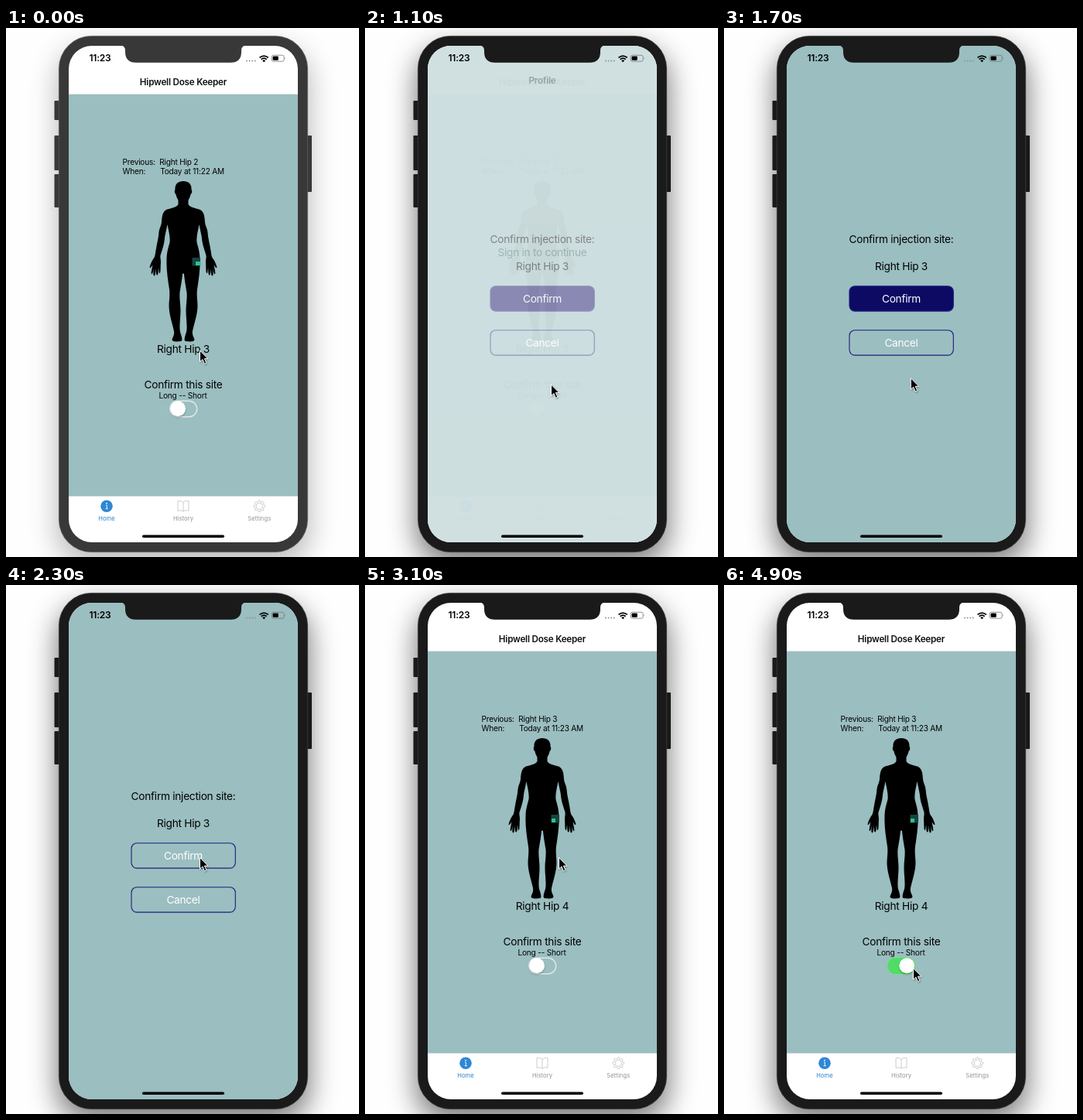
Animation of 456 by 684 pixels, one loop 5 s. Source, as an HTML page:

```html
<!DOCTYPE html>
<html lang="en">
<head>
<meta charset="utf-8">
<title>Injection site app</title>
<style>
html, body { margin: 0; width: 100%; height: 100%; overflow: hidden; background: #fefefe; }
svg { display: block; width: 100vw; height: 100vh; }
text { font-family: Inter, Roboto, sans-serif; letter-spacing: -.02em; white-space: pre; }
.mid { text-anchor: middle; }
.big { font-size: 13.7px; }
.small { font-size: 10.1px; }
.title { font-size: 11.7px; font-weight: 600; fill: #111; }
.tab { font-size: 7.6px; letter-spacing: .01em; fill: #939393; }
.icon { fill: none; stroke: #bcbcbc; stroke-width: .75; stroke-linejoin: round; }
</style>
</head>
<body>
<svg viewBox="0 0 456 684">
  <defs>
    <clipPath id="screen"><rect x="81" y="23" width="296" height="642" rx="30"/></clipPath>
    <filter id="blur" x="-30%" y="-20%" width="160%" height="140%"><feGaussianBlur stdDeviation="18"/></filter>
    <filter id="soft" x="-50%" y="-50%" width="200%" height="200%"><feGaussianBlur stdDeviation="1.2"/></filter>
    <path id="half" d="M229 198C222 198 218 202 218.5 209C217 210 218 214 219.5 215C220 219 222 221 222.5 223V228C221 232 212 233 207 235C202 238 201.5 244 201 251C200.5 256 198 259 197.5 264C197 272 195 278 194 285C192.5 292 193 296 190 299C188 302 186 307 185.5 309.5C186.5 311 188 309 189.5 306C188.5 312 187 317 188 318C189 319 190 315 191 311C190 317 190 320 191.5 320.5C193 321 193 315 194 311C193.5 316 194 320 195.5 319.5C197 319 196.5 314 197 310C197.5 314 197.5 317.5 198.8 317C200 315 199.5 308 200 303C200 299 199 297 199.5 294C202 286 204.5 279 205 272C205.5 267 207 262 208.5 254C210 262 212.3 270 211.5 277C209.5 285 207.5 290 207.5 300C207 312 209 325 211 338C212 346 210.5 352 210.5 360C211 372 215 382 217 392C218 397 215 400 214.5 403C215 406 221 405.5 226 405C229 404 226.5 398 225 393C223.5 386 225.5 376 225.5 365C225.5 357 223.8 350 224.5 342C226 333 227.6 324 228 318L229.3 317V198Z"/>
  </defs>
  <rect width="456" height="684" fill="#fefefe"/>
  <rect id="shadow" x="66" y="26" width="326" height="668" rx="42" filter="url(#blur)"/>

  <g id="device">
    <rect x="62.5" y="94" width="7" height="25" rx="1"/>
    <rect x="62.5" y="139" width="7" height="45" rx="1"/>
    <rect x="62.5" y="189" width="7" height="43" rx="1"/>
    <rect x="388" y="139" width="7" height="73" rx="1"/>
    <rect id="rim" x="68.4" y="10.4" width="321.2" height="667.2" rx="42" stroke-width=".8"/>
  </g>

  <g clip-path="url(#screen)">
    <rect x="81" y="23" width="296" height="642" fill="#fff"/>
    <rect x="81" y="86" width="296" height="519" fill="#9bbec0"/>
    <path d="M81 85.8H377M81 605.3H377" stroke="#a9b9ba" stroke-width=".6"/>
    <text class="mid title" x="229" y="74">Hipwell Dose Keeper</text>

    <g class="small">
      <text x="150.5" y="176.5">Previous:</text><text id="prev" x="198.2" y="176.5"></text>
      <text x="150.5" y="188.5">When:</text><text id="when" x="199.2" y="188.5"></text>
      <text class="mid" x="228.5" y="478.5">Long -- Short</text>
    </g>
    <use href="#half"/>
    <use href="#half" transform="matrix(-1 0 0 1 458 0)"/>
    <rect x="240.5" y="297" width="10.5" height="10.5" fill="#14453e"/>
    <rect id="spot" y="302" height="5" fill="#2fc293"/>
    <text id="next" class="mid big" x="229" y="419.8"></text>
    <text class="mid big" x="229" y="465.8">Confirm this site</text>
    <rect id="bar" x="150" y="451.6" width="158" height="17.4"/>

    <rect x="211.7" y="482.2" width="35" height="20.6" rx="10.3" fill="none" stroke="#e0e8e8" stroke-width="1.4"/>
    <rect id="green" x="211" y="481.5" width="36.4" height="22" rx="11" fill="#4fdd66"/>
    <g id="knob">
      <circle cx="222" cy="494" r="9.8" opacity=".28" filter="url(#soft)"/>
      <circle cx="222" cy="492.3" r="10" fill="#fff"/>
    </g>

    <circle cx="130" cy="618.2" r="7.8" fill="#2f87d6"/>
    <path d="M129 617.2h1.3v4.4M128.6 621.7h3.2" fill="none" stroke="#fff" stroke-width=".9"/>
    <circle cx="130" cy="614.7" r=".9" fill="#fff"/>
    <path class="icon" d="M229 613.3C227 611.2 224 611.3 222 611.8V624.3C225 623.5 227.5 623.8 229 625.3C230.5 623.8 233 623.5 236 624.3V611.8C234 611.3 231 611.2 229 613.3V625"/>
    <g class="icon"><path id="gear"/><circle cx="327.3" cy="618.2" r="4.1"/></g>
    <text class="mid tab" x="130" y="637.4" style="fill:#2f80d0">Home</text>
    <text class="mid tab" x="229" y="637.4">History</text>
    <text class="mid tab" x="327.3" y="637.4">Settings</text>

    <g id="page">
      <rect x="81" y="23" width="296" height="642" fill="#fff"/>
      <text class="mid title" x="229" y="72" style="fill:#888">Profile</text>
      <text class="mid big" x="229" y="295" style="fill:#aaa">Sign in to continue</text>
    </g>

    <g id="modal">
      <rect x="81" y="23" width="296" height="642" fill="#9bbec0"/>
      <text class="mid big" x="229" y="278.2">Confirm injection site:</text>
      <text class="mid big" x="229" y="313">Right Hip 3</text>
      <g stroke="#1d1f7c" stroke-width="1.1" fill="none">
        <rect id="ok" x="162" y="333.7" width="134.3" height="32.4" rx="7"/>
        <rect x="162" y="390.7" width="134.3" height="32.4" rx="7"/>
      </g>
      <text class="mid big" x="229" y="355" fill="#fff">Confirm</text>
      <text class="mid big" x="229" y="412" fill="#fff">Cancel</text>
    </g>

    <text x="107.5" y="43.4" font-size="12" font-weight="600">11:23</text>
    <path d="M311 42.5h12" stroke="#8a9899" stroke-width="2" stroke-linecap="round" stroke-dasharray="0 3.6"/>
    <g fill="none" stroke="#000" stroke-width="1.8">
      <path d="M327.6 38.4A8 8 0 0 1 338.8 38.4M329.7 40.7A5 5 0 0 1 336.7 40.7"/>
    </g>
    <path d="M333.2 44.2L331.2 42.2A2.8 2.8 0 0 1 335.2 42.2Z"/>
    <rect x="343.2" y="35.2" width="16" height="8" rx="2.2" fill="none" stroke="#777" stroke-width=".8"/>
    <rect x="344.6" y="36.6" width="7.2" height="5.2" rx="1"/>
    <path d="M360.3 37.8q1.2 1.4 0 2.8z" fill="#777"/>
    <rect x="176" y="655.6" width="106" height="3.5" rx="1.75"/>
  </g>
  <path id="notch" d="M148 22.5Q154 23 154 29V31Q154 44.8 168 44.8H290Q304 44.8 304 31V29Q304 23 310 22.5Z"/>

  <g id="cursor">
    <path d="M0 0V15.2L3.5 12L6 17.8L8.9 16.5L6.4 11H10.8Z" transform="translate(.6 1.2)" opacity=".35" filter="url(#soft)"/>
    <path d="M0 0V14.6L3.4 11.5L5.9 17.3L8.4 16.2L5.9 10.6H10.4Z" stroke="#fff" stroke-width="1"/>
  </g>
</svg>
<script>
const LOOP = 5000, STEP = 100;
const $ = id => document.getElementById(id);
const set = (id, name, value) => $(id).setAttribute(name, value);
const ramp = (t, a, b) => Math.min(1, Math.max(0, (t - a) / (b - a)));
const smooth = x => x * x * (3 - 2 * x);
const easeOut = x => 1 - (1 - x) ** 2;
const between = (t, a, b) => t >= a && t < b;

// Pointer moves: start, end, from, bend, to
const moves = [
  [0, 400, [250.5, 417], [246, 440], [240.5, 461]],
  [1600, 2200, [240.5, 461], [246, 405], [250.5, 352.5]],
  [3300, 3900, [250.5, 352.5], [210, 420], [240.5, 497]],
  [4700, 4900, [240.5, 497], [243, 496], [244.5, 495.5]]
];

function pointer(t) {
  const [a, b, p, q, r] = moves.filter(m => t >= m[0]).pop();
  const k = smooth(ramp(t, a, b)), j = 1 - k;
  return p.map((v, i) => j * j * v + 2 * j * k * q[i] + k * k * r[i]);
}

function gearPath() {
  const pts = [];
  for (let i = 0; i < 32; i++) {
    const a = (i - .5) * Math.PI / 16, r = i % 4 < 2 ? 7.5 : 5.8;
    pts.push(`${(327.3 + r * Math.cos(a)).toFixed(2)} ${(618.2 + r * Math.sin(a)).toFixed(2)}`);
  }
  return `M${pts.join("L")}Z`;
}

function draw(t) {
  const active = t >= 600, saved = t >= 2400;
  const body = active ? "#1a1a1a" : "#383838";
  set("device", "fill", body);
  set("notch", "fill", body);
  set("rim", "stroke", active ? "#3c3c3c" : "#5c5c5c");
  set("shadow", "opacity", active ? .52 : .27);

  $("prev").textContent = saved ? "Right Hip 3" : "Right Hip 2";
  $("when").textContent = `Today at 11:${saved ? 23 : 22} AM`;
  $("next").textContent = saved ? "Right Hip 4" : "Right Hip 3";
  set("spot", "x", saved ? 241 : 245);
  set("spot", "width", saved ? 5 : 6.5);
  set("bar", "opacity", +between(t, 700, 1100));

  const show = easeOut(ramp(t, 1040, 1260));
  const hide = smooth(ramp(t, 2320, 2700));
  set("page", "opacity", t < 1600 ? Math.min(1, show * 2) : 0);
  set("modal", "opacity", show * (1 - hide));
  set("ok", "fill", t < 2200 ? "#0d0a64" : "none");

  const on = easeOut(ramp(t, 4700, 4900));
  set("green", "opacity", on);
  set("knob", "transform", `translate(${14.3 * on} 0)`);
  set("cursor", "transform", `translate(${pointer(t).join(" ")})`);
}

set("gear", "d", gearPath());
const start = performance.now();
function tick() {
  const t = (performance.now() - start) % LOOP;
  draw(Math.floor(t / STEP) * STEP);
  requestAnimationFrame(tick);
}
tick();
</script>
</body>
</html>
```
